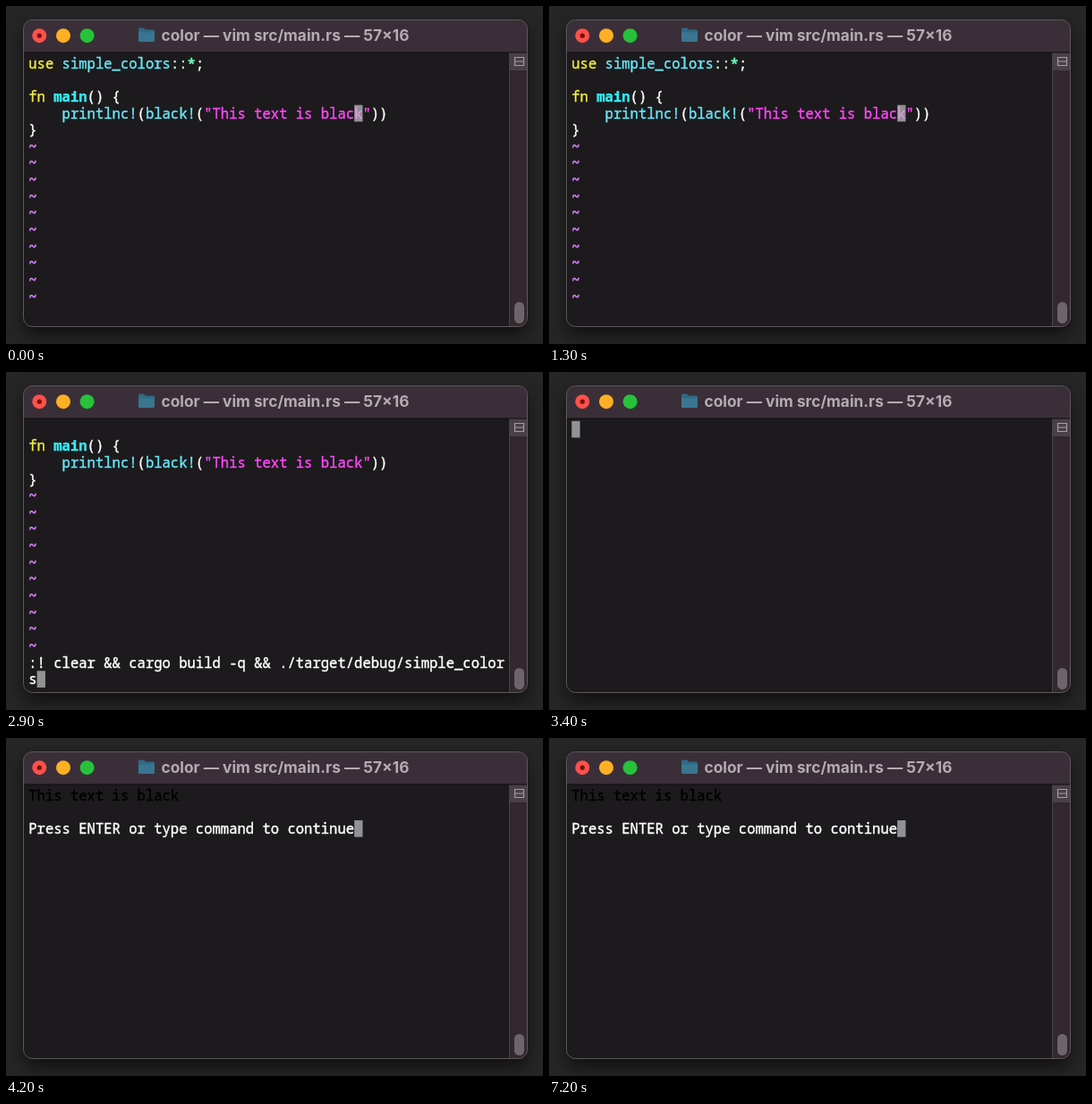
An HTML page that plays this animation: 600x378 px, repeating every 8000 ms.

```html
<!DOCTYPE html>
<html lang="en">
<head>
<meta charset="utf-8">
<title>Terminal</title>
<style>
  html, body { margin: 0; width: 100%; height: 100%; overflow: hidden; background: #272626; }
  svg { display: block; width: 600px; height: 378px; }
  .window { filter: drop-shadow(0 9px 10px rgba(0, 0, 0, .6)); }
  .title { font: 700 17.3px Inter, sans-serif; fill: #b5abb3; text-anchor: middle; }
  #screen { font: 500 15.55px "Noto Sans Mono", "DejaVu Sans Mono", monospace; color: #fff; }
  #screen text, tspan { white-space: pre; fill: currentColor; stroke: currentColor; stroke-width: .4px; }
  .keyword { color: #f1ea3e; }
  .name { color: #34ecf5; font-weight: 700; }
  .ident { color: #68e8fa; }
  .path { color: #c8f5e2; }
  .op { color: #67f5b2; font-weight: 700; }
  .string { color: #fd48f8; }
  .under { color: #d99adc; }
  .tilde { color: #d880fb; font-weight: 700; }
  .black { color: #000; }
</style>
</head>
<body>
<svg viewBox="0 0 600 378">
  <clipPath id="shape"><rect x="19.5" y="15.5" width="563" height="343" rx="10"/></clipPath>
  <rect class="window" x="19.5" y="15.5" width="563" height="343" rx="10" fill="#1c1a1c"/>
  <g clip-path="url(#shape)">
    <path d="M19 15H583V52H19Z" fill="#3a2f38"/>
    <path d="M563 52H583V359H563Z" fill="#34282f"/>
    <path d="M563 52H583V71H563Z" fill="#494147"/>
    <path d="M562.5 52V359M563 71.5H583" stroke="#4a4149" fill="none"/>
    <path d="M19 52H583" stroke="#0c0a0c"/>
  </g>
  <rect x="19.5" y="15.5" width="563" height="343" rx="10" fill="none" stroke="#5c575b"/>
  <circle cx="37.3" cy="33.2" r="8" fill="#fd514b"/>
  <circle cx="37.3" cy="33.2" r="2.6" fill="#78100c"/>
  <circle cx="64" cy="33.2" r="8" fill="#feb024"/>
  <circle cx="90.6" cy="33.2" r="8" fill="#27c13b"/>
  <path d="M148 26q0-1.5 1.5-1.5h4.5l2 2h8.500q1.500 0 1.500 1.500v10q0 1.500-1.500 1.500h-15q-1.500 0-1.500-1.500z" fill="#2f6985"/>
  <path d="M148 29.500H166V38.500q0 1.500-1.500 1.500h-15q-1.500 0-1.500-1.500z" fill="#3a7691"/>
  <text class="title" x="312" y="39">color — vim src/main.rs — 57×16</text>
  <path d="M568.5 57.5H578.5V66.5H568.5ZM568.5 62H578.5" fill="none" stroke="#a39ca1" stroke-width="1.2"/>
  <rect x="568" y="331" width="11" height="24" rx="5.5" fill="#6c666a"/>
  <g id="screen"></g>
</svg>
<script>
const LEFT = 25.3, TOP = 54.8, COL = 9.33, ROW = 18.63, LOOP = 8000;
const screen = document.getElementById("screen");
const span = (cls, text) => `<tspan class="${cls}">${text}</tspan>`;

// The "k" of the string sits under the block cursor in normal mode.
const source = kClass => [
  span("keyword", "use") + span("ident", " simple_colors") + span("path", "::") + span("op", "*") + ";",
  "",
  span("keyword", "fn") + span("name", " main") + "() {",
  span("ident", "    printlnc!") + "(" + span("ident", "black!") + "(" +
    span("string", '"This text is blac') + span(kClass, "k") + span("string", '"') + "))",
  "}",
  ...Array(10).fill(span("tilde", "~"))
];

const command = ":! clear &amp;&amp; cargo build -q &amp;&amp; ./target/debug/simple_color";
const output = [
  span("black", "This text is black"),
  "",
  "Press ENTER or type command to continue"
];

// Each scene: start time, cursor column and row, lines of text.
const scenes = [
  { at: 0, col: 39, row: 3, lines: source("under") },
  { at: 2600, col: 1, row: 15, lines: [...source("string"), ":"] },
  { at: 2900, col: 1, row: 15, lines: [...source("string").slice(1), command, "s"] },
  { at: 3400, col: 0, row: 0, lines: [] },
  { at: 3500, col: 39, row: 2, lines: output }
];

function draw({ col, row, lines }) {
  const cursor = `<rect x="${LEFT + col * COL}" y="${TOP + row * ROW}" width="${COL}" height="${ROW}" fill="#929193"/>`;
  const text = lines.map((line, i) =>
    `<text x="${LEFT}" y="${TOP + 14.9 + i * ROW}">${line}</text>`);
  screen.innerHTML = cursor + text.join("");
}

let shown;
const start = performance.now();
function tick() {
  const time = (performance.now() - start) % LOOP;
  const scene = scenes.findLast(s => s.at <= time);
  if (scene !== shown) draw(shown = scene);
  requestAnimationFrame(tick);
}
tick();
</script>
</body>
</html>
```
